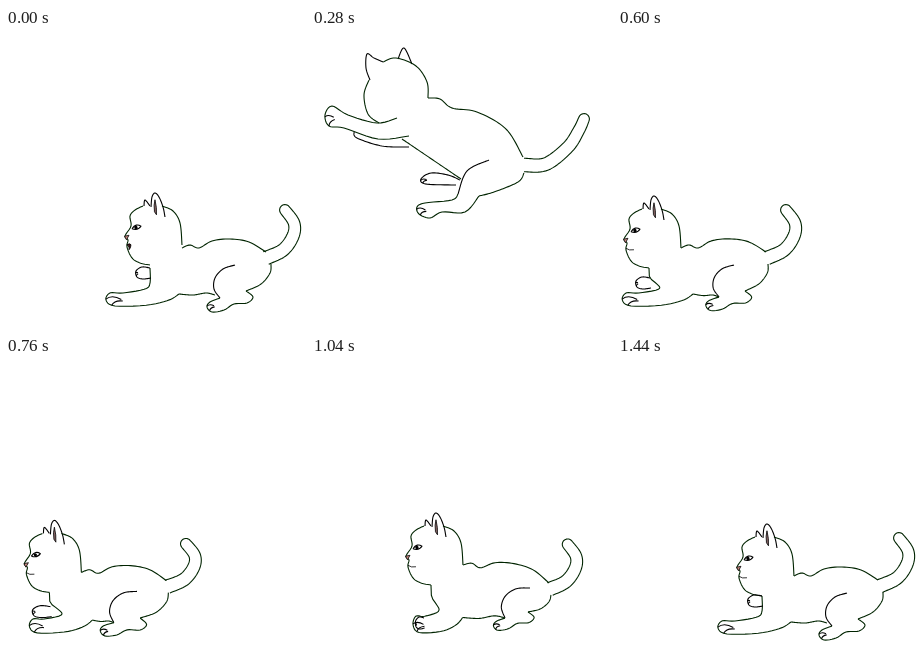
Write an HTML page with a canvas that moves like this. It is 300x300 px and loops after 1.56 s.

```html
<!DOCTYPE html>
<html lang="en">
<head>
<meta charset="utf-8">
<title>Pouncing cat</title>
<style>
  html, body { margin: 0; width: 100%; height: 100%; overflow: hidden; background: #fff; }
  canvas { display: block; width: 300px; height: 300px; }
</style>
</head>
<body>
<canvas id="stage" width="300" height="300"></canvas>
<script>
const ctx = document.getElementById('stage').getContext('2d');
const LOOP = 1560, STEP = 40, SAMPLES = 48;
const HEAD = ['face', 'ear', 'farEar', 'nape'];
const mix = (a, b, u) => a + (b - a) * u;
const clamp = u => Math.max(0, Math.min(1, u));
const last = pts => pts[pts.length - 1];

// Samples a smooth line through a few "x,y" key points, so that any two lines can blend.
function smooth(text) {
  const keys = text.split(' ').map(p => p.split(',').map(Number));
  const at = i => keys[Math.max(0, Math.min(keys.length - 1, i))];
  return Array.from({ length: SAMPLES + 1 }, (_, n) => {
    const s = n / SAMPLES * (keys.length - 1), i = Math.min(Math.floor(s), keys.length - 2), u = s - i;
    return [0, 1].map(k => {
      const [a, b, c, d] = [-1, 0, 1, 2].map(o => at(i + o)[k]);
      return b + u / 2 * (c - a + u * (2 * a - 5 * b + 4 * c - d + u * (3 * (b - c) + d - a)));
    });
  });
}

const pose = parts => Object.fromEntries(Object.entries(parts).map(([k, v]) => [k, smooth(v)]));
const move = (parts, [dx, dy], names) => Object.fromEntries(
  names.map(k => [k, parts[k].map(([x, y]) => [x + dx, y + dy])]));

// Puts the start of a line at a point, scaled and turned.
function place(pts, [x, y], sx = 1, sy = sx, turn = 0) {
  const [ox, oy] = pts[0], c = Math.cos(turn), s = Math.sin(turn);
  return pts.map(([px, py]) => {
    const dx = (px - ox) * sx, dy = (py - oy) * sy;
    return [x + dx * c - dy * s, y + dx * s + dy * c];
  });
}

// Puts a line between two points, keeping its form.
function span(pts, from, to) {
  const size = (a, b) => Math.hypot(b[0] - a[0], b[1] - a[1]);
  const angle = (a, b) => Math.atan2(b[1] - a[1], b[0] - a[0]);
  const end = last(pts), scale = size(from, to) / size(pts[0], end);
  return place(pts, from, scale, scale, angle(from, to) - angle(pts[0], end));
}

const rest = pose({
  face: '137,181 129,185 124,191 125,201 119,211 122,215 121,222 126,233 134,238 144,240',
  ear: '145,182 146,172 149,168 153,172 157,182 159,192',
  farEar: '138,181 139,175 144,181',
  nape: '156,181 167,186 174,198 176,220',
  back: '176,220 184,217 193,220 206,213 224,211 243,214 260,224',
  tail: '262,230 279,222 289,208 290,195 281,182',
  rump: '265,236 264,245 255,256 240,263',
  haunch: '229,237 217,241 209,250 208,261 214,270',
  foot: '214,270 204,274 201,279 206,284 218,282 228,276 241,275 247,269 240,263',
  farFoot: '210,268 210,268',
  belly: '173,266 187,267 200,265 209,267',
  arm: '144,240 144,255 139,261 117,265 104,265 100,272 109,278 142,277 163,272 173,266',
  farArm: '144,240 136,239 130,243 131,249 137,251 145,250'
});

const leap = pose({
  face: '57,52 52,67 56,86 67,95',
  ear: '58,52 54,40 55,26 62,30 71,34',
  farEar: '86,31 92,20 100,36',
  nape: '71,34 84,30 104,38 115,54 116,70',
  back: '116,70 128,71 140,80 165,84 194,101 211,129',
  tail: '212,137 234,136 256,119 267,102 272,91',
  rump: '212,145 206,154 182,164 167,168',
  haunch: '177,132 155,143 146,166',
  foot: '146,166 140,172 113,175 105,179 107,186 118,190 130,184 153,184 167,168',
  farFoot: '148,152 136,147 119,145 109,151 114,156 144,157',
  belly: '90,111 149,151',
  arm: '85,90 65,95 36,87 20,78 13,87 17,98 32,100 66,111 97,108',
  farArm: '42,104 45,110 70,118 97,119'
});

// The trunk glides on while the head turns back and the legs swing down.
const flight = {
  ...leap,
  ...move(leap, [-29, 29], ['back', 'tail', 'rump']),
  ...pose({
    face: '40,69 33,78 27,92 25,100 26,111 36,124',
    ear: '43,79 35,53 42,56 51,65',
    farEar: '46,58 48,52 55,60',
    nape: '47,61 64,61 81,78 86,98',
    arm: '65,126 46,131 30,133 25,116 18,108 12,114 16,128 19,148 32,153 54,152 72,146',
    farArm: '53,129 34,122 32,112 26,112 25,118'
  }),
  haunch: span(leap.haunch, [146, 169], [128, 215]),
  foot: span(leap.foot, [128, 215], [148, 207]),
  farFoot: place(leap.farFoot, [124, 183], 1.26, 1.26, -0.96),
  belly: span(leap.belly, [68, 148], [131, 186])
};
flight.rump = span(flight.rump, flight.rump[0], last(flight.foot));

// A pose on the ground: the resting cat with its joints moved.
function crouch({ head, tail, curl, hip, ankle, heel, reach: [stretch, slide, drop], farPaw, farSize }) {
  const [cx, cy] = rest.arm[0];
  const parts = move(rest, head, HEAD);
  parts.arm = rest.arm.map(([x, y]) => {
    const dx = x - cx, low = clamp((y - 250) / 12);
    return [cx + head[0] + mix(dx, dx * stretch + slide, low), cy + head[1] + (y - cy) * drop];
  });
  return {
    ...parts,
    back: span(rest.back, last(parts.nape), [tail[0] - 1, tail[1] - 6]),
    tail: place(rest.tail, tail, ...curl),
    rump: span(rest.rump, [tail[0] + 1, tail[1] + 6], heel),
    haunch: span(rest.haunch, hip, ankle),
    foot: span(rest.foot, ankle, heel),
    farFoot: place(rest.farFoot, ankle),
    belly: span(rest.belly, last(parts.arm), ankle),
    farArm: place(rest.farArm, farPaw, farSize, 1)
  };
}

const landed = crouch({
  head: [-113, 0], tail: [149, 230], curl: [1], hip: [116, 237], ankle: [101, 269], heel: [127, 263],
  reach: [0.97, 16, 1], farPaw: [32, 250], farSize: 1
});
const backing = crouch({
  head: [-75, -11], tail: [187, 232], curl: [0.92, 0.67], hip: [162, 232], ankle: [122, 262], heel: [149, 260],
  reach: [0.64, 22, 1.2], farPaw: [70, 252], farSize: 1.8
});
const settling = crouch({
  head: [-25, -11], tail: [238, 233], curl: [0.93], hip: [218, 232], ankle: [193, 262], heel: [216, 256],
  reach: [0.68, 12, 1.25], farPaw: [112, 262], farSize: 0.6
});
const ready = { ...rest, ...move(rest, [0, -3], HEAD), ...move(rest, [-2, 0], ['tail']) };

// The front of the cat leaves the ground before the rear does.
const liftOff = (u, x) => u ** (0.9 + Math.max(0, x - 100) * 0.008);
const linear = u => u;
const keys = [
  [0, ready, liftOff],
  [280, leap, u => u ** 1.5],
  [440, flight, linear],
  [600, landed, u => u * u],
  [880, backing, linear],
  [1040, settling, linear],
  [1120, rest, linear],
  [LOOP, rest]
];

function poseAt(t) {
  const i = keys.findIndex((_, n) => t < keys[n + 1][0]);
  const [start, from, ease] = keys[i], [end, to] = keys[i + 1];
  const u = (t - start) / (end - start), cat = {};
  for (const name in rest) {
    cat[name] = from[name].map(([x, y], n) => {
      const k = ease(u, x), [tx, ty] = to[name][n];
      return [mix(x, tx, k), mix(y, ty, k)];
    });
  }
  return cat;
}

// Outlines a tapering, round-tipped tube around a line.
function tube(spine, baseRadius, tipRadius) {
  const sides = [[], []];
  spine.forEach(([x, y], n) => {
    const a = spine[Math.max(0, n - 1)], b = spine[Math.min(SAMPLES, n + 1)];
    const angle = Math.atan2(b[1] - a[1], b[0] - a[0]) + Math.PI / 2;
    const r = mix(baseRadius, tipRadius, n / SAMPLES);
    const dx = r * Math.cos(angle), dy = r * Math.sin(angle);
    sides[0].push([x - dx, y - dy]);
    sides[1].unshift([x + dx, y + dy]);
  });
  const [x, y] = last(spine), [ex, ey] = last(sides[0]);
  const from = Math.atan2(ey - y, ex - x);
  const cap = Array.from({ length: 12 }, (_, n) => {
    const angle = from + Math.PI * (n + 1) / 13;
    return [x + tipRadius * Math.cos(angle), y + tipRadius * Math.sin(angle)];
  });
  return [...sides[0], ...cap, ...sides[1]];
}

function line(pts) {
  ctx.beginPath();
  pts.forEach(p => ctx.lineTo(...p));
  ctx.stroke();
}

// Two short creases running inward from the leftmost end of a paw.
function toes(pts) {
  const tip = pts.reduce((best, p, n) => p[0] < pts[best][0] ? n : best, 0);
  const at = n => pts[Math.max(0, Math.min(SAMPLES, n))];
  const a = at(tip - 9), b = at(tip + 9), mid = [(a[0] + b[0]) / 2, (a[1] + b[1]) / 2];
  for (const [x, y] of [at(tip), at(tip + 5)]) {
    const dx = mid[0] - x, dy = mid[1] - y;
    ctx.beginPath();
    ctx.moveTo(x, y);
    ctx.quadraticCurveTo(x + dx * 0.3 + dy * 0.25, y + dy * 0.3 - dx * 0.25, x + dx * 0.75, y + dy * 0.75);
    ctx.stroke();
  }
}

function shape(d, fill) {
  const path = new Path2D(d);
  if (fill) { ctx.fillStyle = fill; ctx.fill(path); }
  ctx.stroke(path);
}

function eyeOpening(t) {
  if (t < 1240 || t >= 1440) return 1;
  return t >= 1280 && t < 1400 ? 0 : 0.5;
}

function drawFace(face, t) {
  const nose = face.reduce((a, b) => b[0] < a[0] ? b : a);
  const turned = t >= 400 && t < 560, open = eyeOpening(t);
  ctx.save();
  ctx.translate(...nose);
  ctx.scale(turned ? 0.45 : 1, 1);
  ctx.translate(-119, -211);
  shape(`M126 203Q130 ${203 - 6 * open} 135 200.5Q132 205 126 203`);
  if (open) {
    ctx.fillStyle = '#000';
    ctx.beginPath();
    ctx.ellipse(130, 201.7, 1.6, 1.7 * open, 0, 0, 7);
    ctx.fill();
  }
  if (!turned) {
    ctx.lineWidth = 0.8;
    shape('M118.5 210.5L123 209.5L120.5 214Z', '#c98a80');
    if (t < 120) shape('M121 219Q124 217 125 219Q125 222 123 224Q124 221 121 219', '#311');
    else shape('M121 219.5Q124 222 129 221');
    shape('M148.5 186Q147.5 179 149 174Q151 182 150.5 189Z', '#866');
  }
  ctx.restore();
}

function draw(now) {
  const t = Math.floor(now % LOOP / STEP) * STEP;
  const cat = poseAt(t);
  ctx.fillStyle = '#fff';
  ctx.fillRect(0, 0, 300, 300);
  ctx.lineWidth = 1.1;
  ctx.lineJoin = 'round';
  for (const name in cat) {
    ctx.strokeStyle = /haunch|ear|far/i.test(name) ? '#000' : '#002400';
    line(name === 'tail' ? tube(cat.tail, 6.8, 5.4) : cat[name]);
  }
  ctx.strokeStyle = '#000';
  toes(cat.arm);
  toes(cat.foot);
  if (t >= 160 && t < 560) toes(cat.farFoot);
  else toes(cat.farArm);
  if (t < 160 || t >= 400) drawFace(cat.face, t);
}

const begin = performance.now();
function tick() {
  draw(performance.now() - begin);
  requestAnimationFrame(tick);
}
tick();
</script>
</body>
</html>
```
